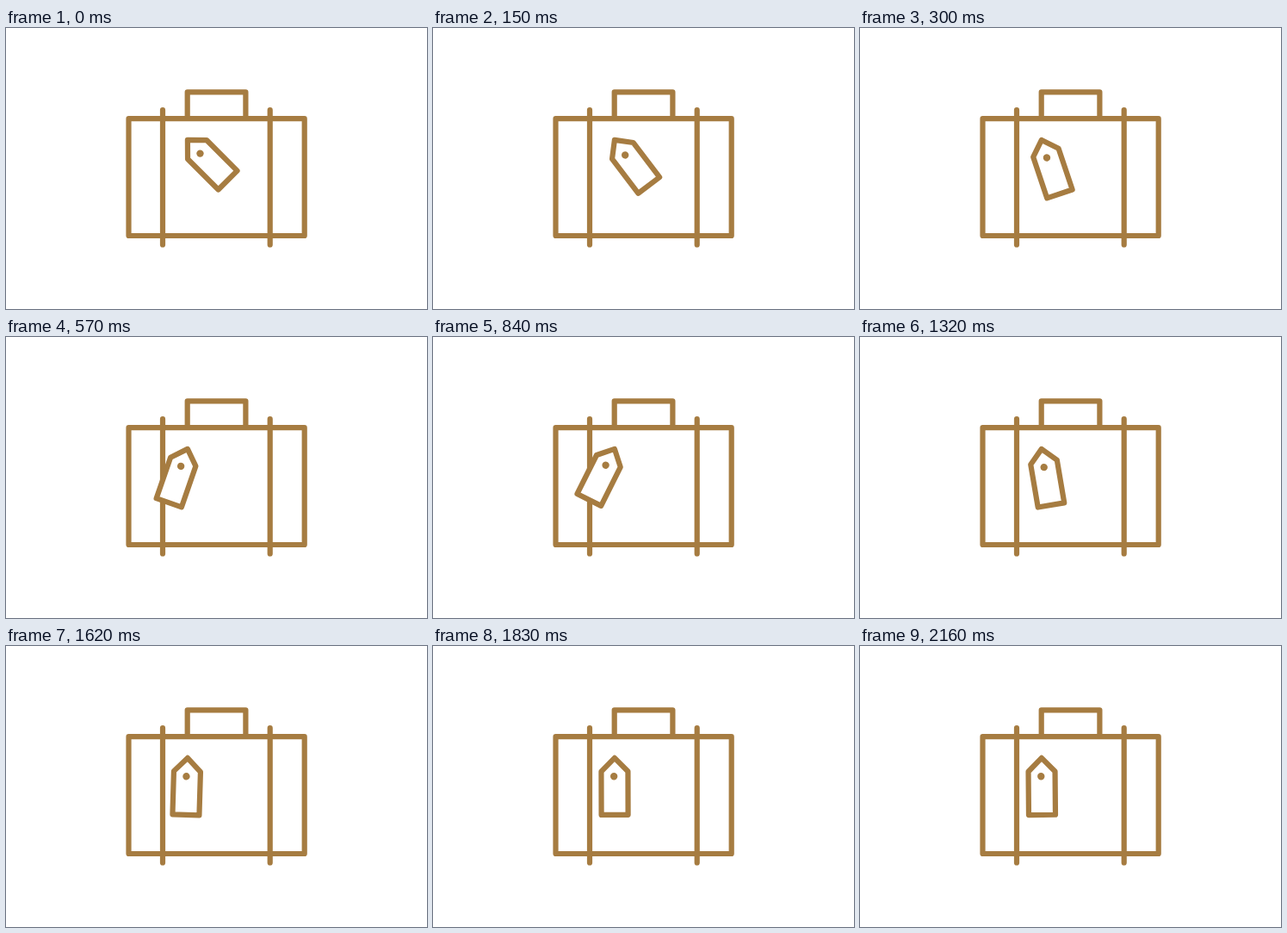
An HTML page for the animation above (2190 ms loop, 489 px wide and 326 px high).

```html
<!DOCTYPE html>
<html lang="en">
<head>
<meta charset="utf-8">
<title>Suitcase</title>
<style>
  html, body { margin: 0; width: 100%; height: 100%; overflow: hidden; background: #fff; }
  svg { display: block; width: 100vw; height: 100vh; }
</style>
</head>
<body>
<svg viewBox="0 0 489 326" fill="none" stroke="#a67c41" stroke-width="6.2" stroke-linecap="round" stroke-linejoin="round">
  <path d="M210.7 105V74.3H278.4V105"/>
  <rect x="142.5" y="105.2" width="204.2" height="135.8"/>
  <path d="M182 95.2V251.5M306.7 95.2V251.5"/>
  <g id="tag">
    <path fill="#fff" d="M0 0L15.5 15.7V66H-15.5V15.7Z"/>
    <circle cx="-.8" cy="21.4" r="4.2" fill="#a67c41" stroke="none"/>
  </g>
</svg>
<script>
  const LOOP = 2190, STEP = 30;
  // Turning points of the swing: [ms, degrees], positive to the right
  const swing = [[0, 45], [750, -30], [1255, 10.6], [1640, -1.8], [1890, 0.5], [LOOP, 0.5]];
  const tag = document.getElementById('tag');
  const ease = s => s * s * (3 - 2 * s);

  function angleAt(t) {
    const i = swing.findIndex(k => k[0] > t);
    const [t0, a0] = swing[i - 1], [t1, a1] = swing[i];
    return a0 + (a1 - a0) * ease((t - t0) / (t1 - t0));
  }

  function draw(now) {
    const t = Math.floor((now % LOOP) / STEP) * STEP;
    tag.setAttribute('transform', `translate(210.9 129.9) rotate(${-angleAt(t)})`);
  }

  const start = performance.now();
  function tick() {
    draw(performance.now() - start);
    requestAnimationFrame(tick);
  }
  tick();
</script>
</body>
</html>
```
